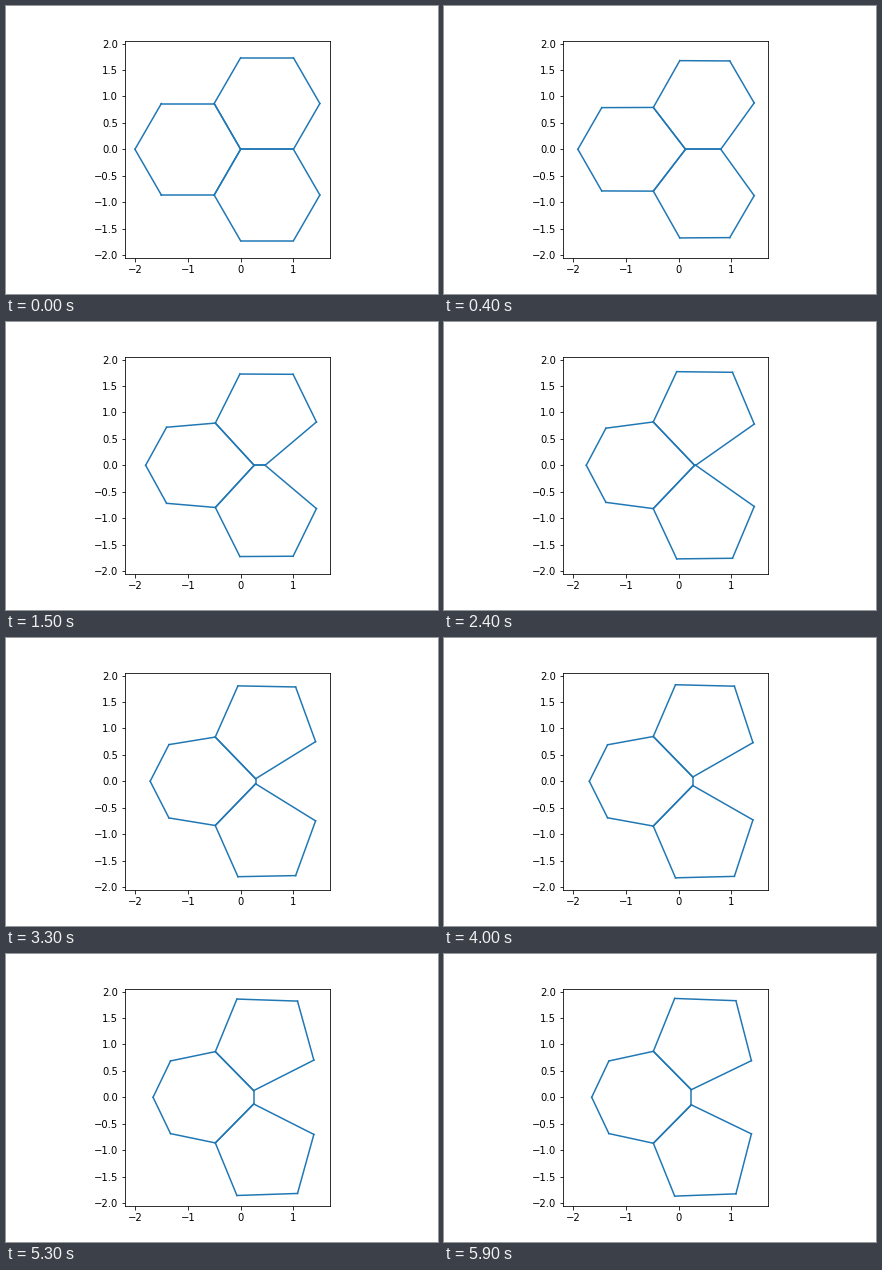
Write a matplotlib script that moves like this. It is 432 px wide and 288 px high and loops after 6 s.

```python
import numpy as np
import matplotlib.pyplot as plt
from matplotlib.animation import FuncAnimation
from matplotlib.collections import LineCollection

FRAMES = 60
INTERVAL = 100

# Upper half of a tissue that is symmetric about y = 0.
# Columns: tip x, back (x, y), joint (x, y), inner edge middle x and length,
# front (x, y), top right (x, y), top left (x, y).
# A negative length means the inner edge has flipped to vertical.
R = np.sqrt(3) / 2
KEY_TIMES = np.array([0, 9, 24, 59])
KEY_POSES = np.array([
    [-2, -1.5, R, -0.5, R, 0.5, 1, 1.5, R, 1, 2 * R, 0, 2 * R],
    [-1.845, -1.425, 0.745, -0.476, 0.785, 0.41, 0.408, 1.428, 0.853, 0.975, 1.688, 0.008, 1.693],
    [-1.748, -1.376, 0.702, -0.48, 0.82, 0.313, 0.022, 1.432, 0.78, 1.02, 1.76, -0.036, 1.772],
    [-1.645, -1.32, 0.687, -0.478, 0.87, 0.24, -0.286, 1.378, 0.693, 1.085, 1.828, -0.074, 1.871],
])


def modes(t):
    """A resting state plus fast, medium and slow relaxation."""
    t = np.asarray(t, dtype=float)
    return np.stack([np.ones_like(t)] + [np.exp(-t / tau) for tau in (3, 10, 50)], axis=-1)


WEIGHTS = np.linalg.solve(modes(KEY_TIMES), KEY_POSES)


def mirror(points):
    return [(x, -y) for x, y in points]


def edges(cell):
    return list(zip(cell, cell[1:] + cell[:1]))


def tissue(t):
    tip, bx, by, jx, jy, mid, gap, fx, fy, rx, ry, lx, ly = modes(t) @ WEIGHTS
    back, joint = (bx, by), (jx, jy)
    if gap > 0:
        inner = [(mid - gap / 2, 0), (mid + gap / 2, 0)]
        center = inner[:1]
    else:
        inner = [(mid, -gap / 2)]
        center = inner + mirror(inner)
    upper = [joint, *inner, (fx, fy), (rx, ry), (lx, ly)]
    left = [(tip, 0), back, joint, *center, *mirror([joint, back])]
    return edges(upper) + edges(left) + edges(mirror(upper))


fig, ax = plt.subplots(figsize=(6, 4), dpi=72)
fig.subplots_adjust(left=0.125, right=0.9, bottom=0.125, top=0.88)
ax.set_aspect("equal")
ax.set(xlim=(-2.1885, 1.6885), ylim=(-2.058, 2.058),
       xticks=np.arange(-2, 2), yticks=np.arange(-2, 2.1, 0.5))
walls = LineCollection(tissue(0), colors="C0", linewidths=1.5,
                       capstyle="projecting", zorder=2)
ax.add_collection(walls, autolim=False)


def update(frame):
    walls.set_segments(tissue(frame))
    return [walls]


anim = FuncAnimation(fig, update, frames=FRAMES, interval=INTERVAL,
                     repeat=True, repeat_delay=0)
plt.show()
```
